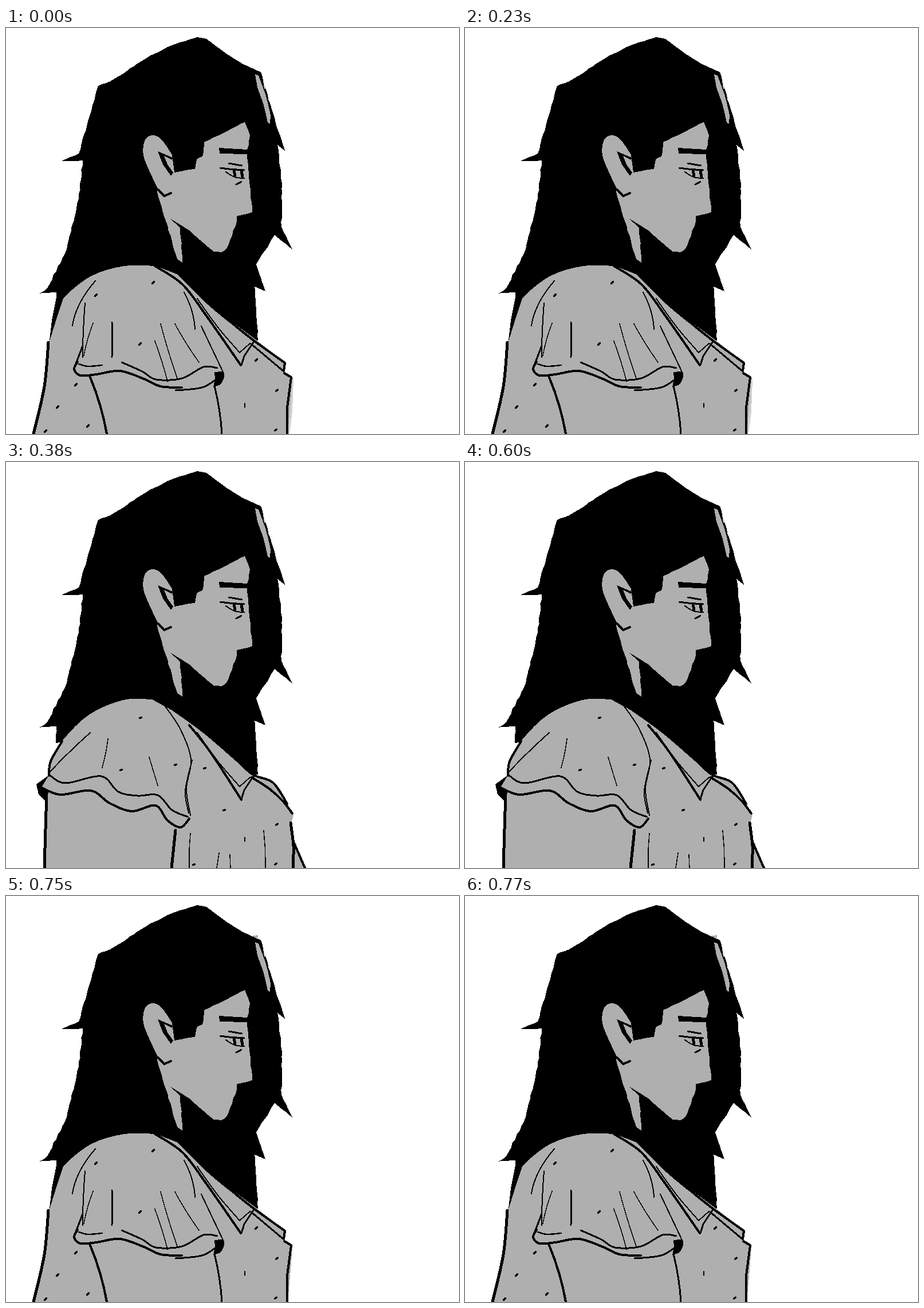
These frames come from a looping animation (791x708 px, 0.79 s). An HTML page:

```html
<!DOCTYPE html>
<html lang="en">
<head>
<meta charset="utf-8">
<title>Turning shoulder</title>
<style>
html, body { margin: 0; width: 100%; height: 100%; overflow: hidden; background: #fff; }
svg { display: block; width: 791px; height: 708px; }
path { stroke-linecap: round; stroke-linejoin: round; }
</style>
</head>
<body>
<svg id="stage" viewBox="0 0 791 708" shape-rendering="crispEdges"></svg>
<script>
const INK = '#000', GREY = '#afafaf', PALE = '#d2d2d2';
const stage = document.getElementById('stage');

let seed = 7;
const random = () => (seed = seed * 16807 % 2147483647) / 2147483647;
const parse = text => text.trim().split(/\s+/).map(pair => pair.split(',').map(Number));

function add(parent, tag, attrs = {}) {
  const el = document.createElementNS('http://www.w3.org/2000/svg', tag);
  for (const key in attrs) el.setAttribute(key, attrs[key]);
  return parent.appendChild(el);
}

// Smooth runs through key points; '/' makes a corner between runs
function trace(text) {
  return text.split('/').map((run, n) => {
    const p = parse(run);
    let d = (n ? 'L' : 'M') + p[0];
    for (let i = 0; i + 1 < p.length; i++) {
      const a = p[i - 1] || p[i], b = p[i], c = p[i + 1], e = p[i + 2] || c;
      d += `C${b.map((v, k) => v + (c[k] - a[k]) / 6)} ${c.map((v, k) => v - (e[k] - b[k]) / 6)} ${c}`;
    }
    return d;
  }).join('');
}

const shape = (g, text, fill = INK) => add(g, 'path', { d: trace(text), fill });
const stroke = (g, width, d) => add(g, 'path', { d, fill: 'none', stroke: INK, 'stroke-width': width });
const line = (g, width, text) => stroke(g, width, trace(text));

// Straight-sided shape with hand-cut, slightly ragged edges
function ragged(g, text, fill) {
  const p = parse(text), points = [];
  p.forEach(([x, y], i) => {
    const [u, v] = p[(i + 1) % p.length];
    const steps = Math.ceil(Math.hypot(u - x, v - y) / 9);
    for (let k = 0; k < steps; k++) {
      const wobble = k ? random() * 2 - 1 : 0;
      points.push([x + (u - x) * k / steps + wobble, y + (v - y) * k / steps + wobble / 2]);
    }
  });
  add(g, 'polygon', { points: points.join(' '), fill });
}

// Cloth fold: one bow between two ends, pushed sideways by bend
function fold(g, x, y, u, v, bend = 0, width = 2) {
  stroke(g, width, `M${x},${y}Q${(x + u) / 2 + bend},${(y + v) / 2} ${u},${v}`);
}

// Fabric pattern: small slanted flecks
function flecks(g, text, slant) {
  for (const [x, y] of parse(text)) stroke(g, 3.5, `M${x - 1.5},${y + slant}l3,${-2 * slant}`);
}

function drawHair(g) {
  ragged(g, `333,16 350,19 385,45 412,62 445,77 471,166 487,214 474,204 482,272 481,347 500,386
    469,361 437,412 453,459 434,451 440,545 360,550 200,470 87,490 88,461 58,463 72,454 106,386
    127,298 134,231 97,232 127,219 161,101 187,90 252,48 290,30`, INK);
  shape(g, '448,86/454,106/451,106', PALE);
  shape(g, '435,81/441,83 454,119 462,152/461,167/457,165 450,135 439,104', GREY);
}

function drawFace(g) {
  ragged(g, `417,164 426,187 421,220 430,321 403,328 401,345 385,385 376,391 363,390 345,375 320,353
    285,331 304,348 308,409 299,403 269,303 264,284 292,280 294,252 330,246 334,228 343,224 346,199`, GREY);
  shape(g, '270,290 253,255 240,222 242,197 255,187 271,194 290,221/294,252/300,285', GREY);
  shape(g, '265,215/291,226/290,230/276,223/282,238 292,252/288,258/274,238');
  line(g, 4, '266,282 276,293/288,288');
  shape(g, '372,209/421,212/421,220/373,219');
  line(g, 3, '389,236 412,240');
  line(g, 3, '374,244 390,246 416,248');
  line(g, 2, '384,251 399,260 416,262');
  line(g, 5, '398,248 400,258');
  line(g, 5, '411,249 413,260');
  line(g, 3, '402,273 411,268');
}

// Parts of the bodice that stay put in both poses
function drawBodice(g) {
  line(g, 3, '411,588/416,572/432,548');
  line(g, 2, '334,472 370,522 408,566/426,550');
  flecks(g, '473,632 471,701', 1);
  fold(g, 417, 655, 417, 661);
}

function drawFront(g) {
  shape(g, '75,546/80,515 96,476 148,433 207,415 262,415/300,430 352,482 402,523/402,518 441,547 488,584/485,598/500,608 498,640 492,708/45,708 66,632 75,546', GREY);
  shape(g, '90,460/103,463/92,495 76,546/80,510');
  line(g, 5, '74,548 67,625 48,708');
  line(g, 4, '260,415 308,447 350,502 410,588');
  line(g, 4, '401,520 434,546 487,584/485,598');
  line(g, 3, '428,551 484,598');
  line(g, 4, '486,602/498,609/491,662/491,708');
  drawBodice(g);

  fold(g, 156, 441, 116, 519, -14);
  fold(g, 138, 480, 134, 574, -2);
  fold(g, 152, 515, 136, 571, -3, 1.5);
  fold(g, 185, 513, 185, 574, 1, 3);
  fold(g, 260, 546, 282, 616, 2, 1.5);
  fold(g, 270, 516, 299, 611, -2, 1.5);
  fold(g, 295, 516, 337, 583, -3, 1.5);
  fold(g, 311, 461, 330, 525, 8);
  fold(g, 341, 520, 379, 600);

  line(g, 3, '134,554 121,588');
  line(g, 4, '125,582 119,595 130,606 158,604 199,598 241,612 270,625 307,627');
  line(g, 2.5, '127,586 143,590 168,588');
  line(g, 3, '202,583 238,599 262,613 307,611 345,591 369,593');
  line(g, 3, '296,632 345,626 379,603');
  shape(g, '364,600 381,601 376,620 362,626/365,612');
  fold(g, 147, 609, 176, 708, 6, 4);
  fold(g, 364, 624, 377, 708, 4, 3);
  flecks(g, '257,444 234,551 122,622 90,661 69,703 157,466 143,694 437,579', 1.5);
}

function drawSide(g) {
  shape(g, '74,545/77,522 100,484 146,440 205,415 255,414/290,433 345,473 402,522/402,516 429,543 466,557 491,595/502,617/496,634/501,659 522,708/67,708/70,592/53,566', GREY);
  line(g, 4, '75,547 78,522 98,487');
  line(g, 4, '320,459 357,506 411,589');
  line(g, 4, '402,519 431,545 466,559 491,596');
  line(g, 4, '429,550 460,570 484,592 500,613');
  line(g, 5, '497,629 502,670 501,708');
  line(g, 4, '502,662 522,708');
  drawBodice(g);

  line(g, 2, '275,422 304,465 323,518 315,570 322,616');
  line(g, 2, '325,520 313,574 319,612');
  fold(g, 147, 472, 77, 540, -3);
  fold(g, 178, 483, 168, 533, 2, 1.5);
  fold(g, 250, 515, 265, 564, 0, 1.5);

  shape(g, '75,546/53,562/57,580 70,592/75,573/63,566');
  line(g, 4, '57,565 94,580 148,573 181,595 220,609 261,599 282,625 305,637 320,622');
  line(g, 3, '76,546 104,560 166,548 196,575 230,582 265,581 290,607 318,619');
  line(g, 5, '71,579 69,640 67,708');
  line(g, 5, '296,642 289,708');
  fold(g, 322, 648, 320, 708, -2, 1.5);
  fold(g, 372, 682, 368, 708, 0, 1.5);
  fold(g, 391, 685, 392, 708, 0, 1.5);
  fold(g, 450, 643, 453, 708, 2, 1.5);
  flecks(g, '235,446 201,537 296,528 347,534 381,607 328,702', 0.5);
}

function layer(draw, visible) {
  const g = add(stage, 'g');
  draw(g);
  return { g, visible };
}

const turned = t => t >= 380 && t < 750;
const layers = [
  layer(drawHair, () => true),
  layer(drawFace, () => true),
  layer(g => shape(g, '499,608/502,612/500,670/495,708/492,708', PALE), t => t < 380),
  layer(drawFront, t => !turned(t)),
  layer(drawSide, turned),
  layer(g => shape(g, '428,70/440,68/440,74', GREY), t => t >= 750)
];

function frame() {
  const t = performance.now() % 790;
  for (const { g, visible } of layers) g.setAttribute('visibility', visible(t) ? 'visible' : 'hidden');
  requestAnimationFrame(frame);
}
frame();
</script>
</body>
</html>
```
